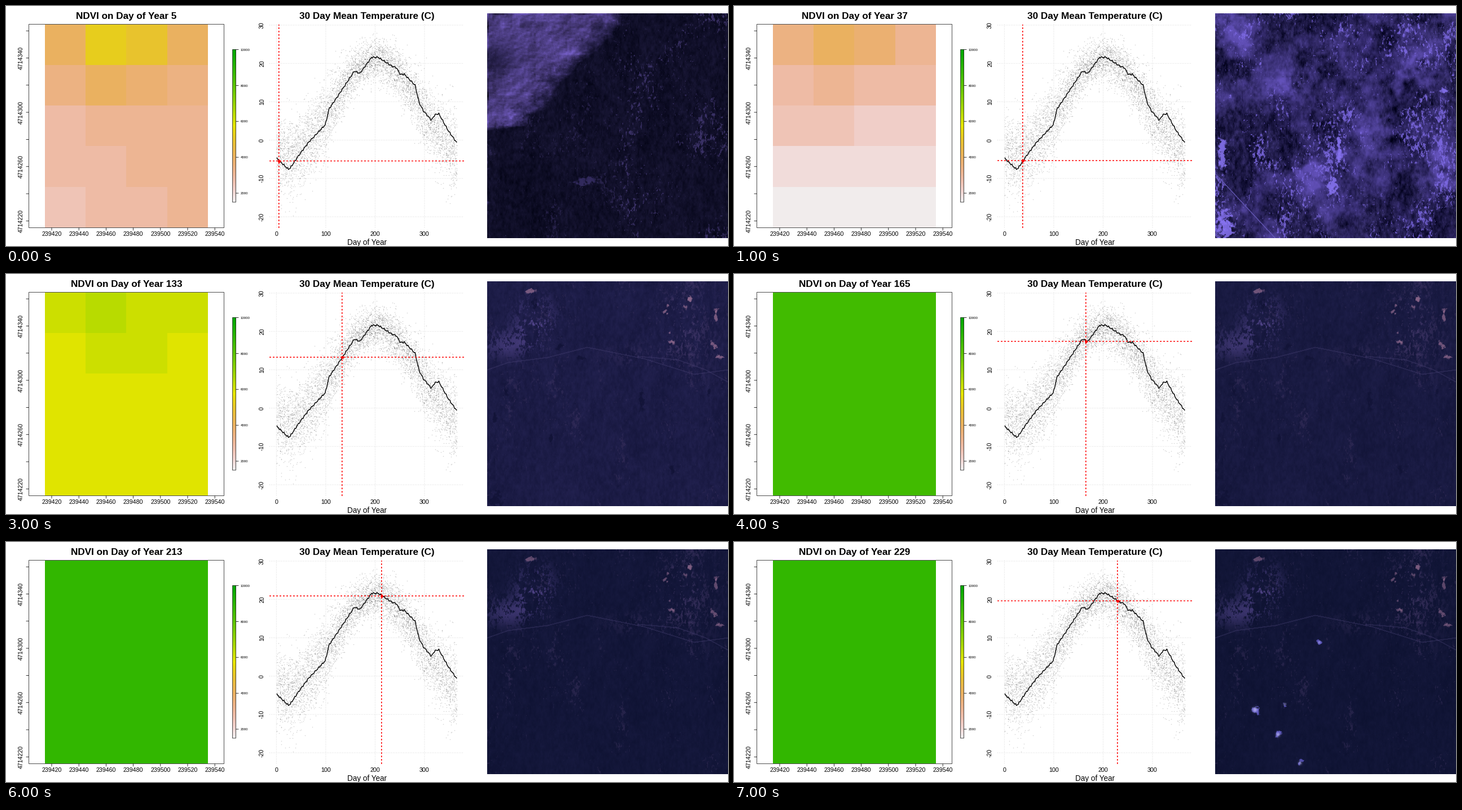
These frames come from a looping animation (1280x427 px, 8 s). A matplotlib script:

```python
import colorsys
import numpy as np
import matplotlib.pyplot as plt
from matplotlib.animation import FuncAnimation
from matplotlib.colors import ListedColormap
from matplotlib.patches import Rectangle

DPI = 64
PT = 72 / DPI  # points per pixel
plt.rcParams["font.family"] = "Liberation Sans"

# day: NDVI level in hundreds, change per row south, per column east,
# and extra height of the bright spot at the north edge
GROWTH = {
    5: (33, -1.2, 1.2, 21),
    37: (31, -3.8, -0.5, 8),
    85: (25.2, -0.8, -2, 9),
    133: (59.3, -0.6, 0, 3.6),
    165: (85, 0, 0, 0),
    197: (87.5, 0.3, -1.3, 0),
    213: (88, 0, 0, 0),
    229: (88, 0, 0, 0),
}
DAYS = list(GROWTH)

# turning points of the mean temperature: day, degrees
TURNS = [(1, -4.8), (24, -7.6), (28, -7.3), (43, -4.4), (65, -0.6), (99, 4),
         (107, 8.2), (126, 11.8), (158, 18), (169, 17.4), (193, 21.6),
         (206, 21.6), (234, 19.3), (243, 18.9), (251, 17.1), (259, 17.2),
         (281, 14.3), (289, 9.8), (298, 7.6), (314, 5.2), (321, 6.6),
         (329, 6.9), (348, 2.5), (365, -0.6)]


def day_x(day):
    return 479.4 + 0.875 * day


def temp_y(temp):
    return 238.6 - 6.82 * temp


def mean_temp(day):
    wiggle = 0.14 * np.sin(0.9 * day) + 0.1 * np.sin(1.7 * day + 1)
    return np.interp(day, *zip(*TURNS)) + wiggle


def ndvi(day):
    level, south, east, peak = GROWTH[day]
    row, col = np.mgrid[0:5, 0:4]
    spot = peak * np.exp(-row**2 - ((col - 1.3) / 1.3) ** 2)
    value = level + south * row + east * (col - 1.5) + spot
    return 100 * (3 * np.round((value - 1) / 3) + 1)


def terrain(n=255):
    """White through orange and yellow to green."""
    colors = []
    for t in np.linspace(1, 0, n):
        if t < 0.5:
            hsv = (4 - 4 * t) / 12, 1, 0.65 + 0.5 * t
        else:
            u = 2 * t - 1
            hsv = (1 - u) / 6, 1 - u, 0.9 + 0.05 * u
        colors.append(colorsys.hsv_to_rgb(*hsv))
    return ListedColormap(colors)


# ---- satellite scenes -------------------------------------------------

LEFT, TOP, W, H = 853, 13, 427, 400
Y, X = np.mgrid[TOP:TOP + H, LEFT:LEFT + W].astype(float)


def noise(rng, sx, sy):
    grid = rng.random((int(H / sy) + 2, int(W / sx) + 2))
    gy, gx = np.arange(H) / sy, np.arange(W) / sx
    iy, ix = gy.astype(int), gx.astype(int)
    fy, fx = (gy - iy)[:, None], (gx - ix)[None, :]
    a, b = grid[np.ix_(iy, ix)], grid[np.ix_(iy, ix + 1)]
    c, d = grid[np.ix_(iy + 1, ix)], grid[np.ix_(iy + 1, ix + 1)]
    return (a * (1 - fx) + b * fx) * (1 - fy) + (c * (1 - fx) + d * fx) * fy


def fbm(rng, sx, sy, octaves=3):
    n = sum(noise(rng, max(sx / 2**k, 1), max(sy / 2**k, 1)) * 0.6**k
            for k in range(octaves))
    return (n - n.mean()) / n.std()


def blend(img, color, alpha):
    a = np.clip(alpha, 0, 1)[..., None]
    img += (np.array(color) - img) * a


def bump(x, y, rx, ry):
    return np.exp(-((X - x) / rx) ** 2 - ((Y - y) / ry) ** 2)


def patches(img, rng, spots, color, opacity=1.0):
    rough = fbm(rng, 6, 6)
    for x, y, rx, ry in spots:
        d = np.hypot((X - x) / rx, (Y - y) / ry)
        blend(img, color, np.clip((1.1 - d + 0.35 * rough * (d < 2)) * 2, 0, 1) * opacity)


def scatter_spots(rng, x, y, dx, dy, count, size):
    """Small ellipses strewn around a centre."""
    return [(rng.normal(x, dx), rng.normal(y, dy), *rng.uniform(size / 2, size, 2))
            for _ in range(count)]


def ground(rng, base, grain, tint=(0.8, 0.7, 1.2)):
    n = 0.6 * fbm(rng, 26, 60) + fbm(rng, 4, 7)
    return np.array(base) + grain * n[..., None] * np.array(tint)


def specks(img, rng, color, cut, weight=1.0):
    n = fbm(rng, 3, 5) + 0.8 * fbm(rng, 40, 60)
    blend(img, color, np.clip((n - cut) * 0.6, 0, 0.8) * weight)


LAKES = [(937, 50, 7, 8), (980, 127, 5, 10), (1020, 149, 8, 3), (1127, 230, 4, 17),
         (1180, 347, 3, 10), (887, 212, 4, 9), (867, 256, 4, 8), (966, 295, 3, 9),
         (868, 400, 13, 12), (1246, 212, 3, 7)]


def winter_cloud():
    rng = np.random.default_rng(1)
    img = ground(rng, (16, 15, 40), 3.6)
    specks(img, rng, (74, 62, 125), 1.7, 0.5 + 0.4 * (X > 1080))
    patches(img, rng, [(1030, 310, 16, 9)], (70, 58, 125), 0.6)
    lumps = fbm(rng, 28, 24, 5)
    relief = lumps - np.roll(lumps, (3, 3), (0, 1))
    edge = np.interp(Y, [14, 110, 185, 212, 226], [1112, 1014, 948, 918, 840])
    alpha = np.clip((edge - X) / 45 + 0.18 * lumps, 0, 1)
    alpha *= 1 - 0.65 * bump(858, 95, 45, 32)
    light = 1 + 0.16 * relief + 0.08 * lumps + 0.25 * bump(905, 195, 50, 22)
    shade = np.array([84, 68, 142]) * light[..., None]
    img += (shade - img) * (alpha * 0.9)[..., None]
    return img


def winter_haze():
    rng = np.random.default_rng(2)
    img = ground(rng, (27, 23, 66), 10)
    haze = 0.12 + 0.18 * fbm(rng, 50, 50, 5)
    wisps = 1 + 0.35 * fbm(rng, 14, 14)
    for x, y in [(1140, 220), (1020, 290), (985, 140), (1210, 110), (890, 30), (1250, 300)]:
        haze += 0.45 * bump(x, y, 42, 42) * wisps
    blend(img, (112, 92, 208), np.clip(haze, 0, 0.8))
    specks(img, rng, (130, 110, 235), 1.3)
    patches(img, rng, [(1060, 318, 9, 16), (868, 390, 14, 22), (866, 265, 7, 25),
                       (1262, 150, 8, 4), (1072, 250, 3, 26)], (138, 118, 246), 0.85)
    track = np.abs(Y - (298 + (X - 853) * 1.08))
    blend(img, (105, 92, 190), np.clip(1.5 - track, 0, 0.8) * (X < 960))
    return img


def thaw():
    rng = np.random.default_rng(3)
    img = ground(rng, (29, 23, 62), 7)
    blend(img, (46, 29, 56), np.clip(0.3 * fbm(rng, 22, 110), 0, 0.6))
    specks(img, rng, (92, 70, 122), 1.9, 0.7)
    ponds = [(*rng.uniform((870, 30), (1270, 380)), *rng.uniform(1.5, 4, 2))
             for _ in range(16)]
    patches(img, rng, LAKES + ponds, (134, 118, 240))
    patches(img, rng, [(1127, 230, 5, 18), (1108, 285, 6, 4)], (198, 160, 236))
    return img


def leafed(day, clouds=()):
    """Green season; the land stays put and darkens with the date."""
    rng = np.random.default_rng(4)
    t = (day - 133) / 96
    img = ground(rng, (28 - 11 * t, 28 - 7 * t, 70 - 16 * t), 2.2 - t)
    town = bump(938, 85, 32, 40) + 0.6 * bump(890, 125, 45, 25)
    east = bump(1205, 90, 45, 95) + 0.5 * bump(1120, 145, 60, 20)
    specks(img, rng, (112, 92, 178), -0.3, 0.8 * np.clip(town, 0, 1))
    specks(img, rng, (104, 82, 138), 0.5, 0.5 * np.clip(east, 0, 1))
    specks(img, rng, (72, 58, 104), 2, 0.45)
    for xs, ys in [([853, 890, 960, 1030, 1130, 1220, 1280], [170, 157, 148, 130, 150, 178, 170]),
                   ([1120, 1190, 1240, 1280], [146, 152, 170, 192])]:
        road = np.abs(Y - np.interp(X, xs, ys))
        blend(img, (75, 68, 120), np.clip(1.2 - road, 0, 0.3) * (X >= xs[0]))
    patches(img, rng, LAKES, (13, 15, 48), 0.6 - 0.3 * t)
    fields = [(932, 30, 9, 4)]
    for x, y in [(1172, 65), (1175, 110), (1206, 46), (1258, 75), (1255, 130), (1263, 148)]:
        fields += scatter_spots(rng, x, y, 3, 5, 3, 5)
    patches(img, rng, fields, (142, 104, 140), 0.8 - 0.2 * t)
    for x, y, r in clouds:
        patches(img, rng, scatter_spots(rng, x, y, r / 3, r / 3, 3, r), (94, 88, 196), 0.8)
        blend(img, (205, 200, 255), r / 10 * bump(x, y, r * 0.6, r * 0.6))
    return img


CLOUDS = {
    197: [(1193, 81, 10), (1165, 68, 7), (1272, 106, 6), (907, 119, 4), (1203, 258, 5),
          (1257, 202, 4), (1180, 35, 3), (1178, 155, 4)],
    229: [(923, 298, 7), (964, 342, 6), (976, 288, 4), (1003, 393, 5), (1037, 178, 4)],
}
SCENES = [winter_cloud(), winter_haze(), thaw()]
SCENES += [leafed(day, CLOUDS.get(day, ())) for day in DAYS[3:]]
SCENES = [np.clip(s, 0, 255).astype(np.uint8) for s in SCENES]

# ---- figure -----------------------------------------------------------

fig = plt.figure(figsize=(1280 / DPI, 427 / DPI), dpi=DPI, facecolor="white")
ax = fig.add_axes([0, 0, 1, 1])
ax.axis("off")


def text(x, y, s, size, **kw):
    kw = {"ha": "center", "va": "baseline", **kw}
    return ax.text(x, y, s, fontsize=size * PT, **kw)


def line(xs, ys, color="black", width=0.8, **kw):
    return ax.plot(xs, ys, color=color, lw=width * PT, snap=False, **kw)[0]


def frame_box(x0, y0, x1, y1):
    ax.add_patch(Rectangle((x0, y0), x1 - x0, y1 - y0, fill=False, snap=False,
                           ec="#222222", lw=0.8 * PT, zorder=4))


def picture(data, extent, **kw):
    return ax.imshow(data, extent=extent, aspect="auto", interpolation="nearest", **kw)


# NDVI map
scale = dict(cmap=terrain(), vmin=1500, vmax=10000)
cells = picture(ndvi(DAYS[0]), (69, 358, 394, 33), **scale)
frame_box(40.5, 32.5, 386.5, 394.5)
for k in range(7):
    x = 81 + 48.2 * k
    line([x, x], [394.5, 399])
    text(x, 409, str(239420 + 20 * k), 10.6)
for k in range(8):
    y = 382.3 - 48.3 * k
    line([36, 40.5], [y, y])
    if k % 2 == 0:
        text(27, y, str(4714220 + 20 * k), 10.6, rotation=90, va="center")
title = text(213.5, 23, "", 17.1, weight="bold")

# colour key
picture(np.linspace(10000, 1500, 255)[:, None], (401.5, 407.5, 349, 77.5), **scale)
frame_box(401.5, 77.5, 407.5, 349)
for v in range(2000, 10001, 2000):
    y = 77.5 + (10000 - v) * 271.5 / 8500
    line([407.5, 412], [y, y])
    text(416, y + 2.2, str(v), 6.1, ha="left")

# temperature chart
text(640, 23, "30 Day Mean Temperature (C)", 17.1, weight="bold")
text(640, 425, "Day of Year", 13.5)
dots = dict(color="#d6d6d6", width=1, linestyle=(0, (1, 2)), zorder=1)
for d in range(0, 301, 100):
    line([day_x(d)] * 2, [33, 395], **dots)
    text(day_x(d), 409, str(d), 10.6)
for t in range(-20, 31, 10):
    line([467, 812], [temp_y(t)] * 2, **dots)
    text(454, temp_y(t), str(t), 10.6, rotation=90, va="center")

rng = np.random.default_rng(11)
days = np.arange(1, 366)
obs_day = np.tile(days, 15)
season = np.cos(2 * np.pi * (obs_day - 20) / 365)
obs = 8.5 - 12.5 * season + rng.normal(size=obs_day.size) * (4 + 1.2 * season)
keep = (obs > -21) & (obs < 28.5)
ax.scatter(day_x(obs_day[keep]), temp_y(obs[keep]), s=(1.5 * PT) ** 2,
           color="black", alpha=0.18, lw=0, zorder=2)
line(day_x(days), temp_y(mean_temp(days)), width=1.4, zorder=3)

red = dict(color="red", width=1.5, linestyle=(0, (2, 2)), zorder=5)
v_line = line([0, 0], [395, 33], **red)
h_line = line([467, 812], [0, 0], **red)
marker = line([0], [0], color="red", marker="o", ms=5 * PT, mew=0, zorder=6)

photo = picture(SCENES[0], (LEFT, LEFT + W, TOP + H, TOP))

ax.set_xlim(0, 1280)
ax.set_ylim(427, 0)


def draw(i):
    day = DAYS[i]
    x, y = day_x(day), temp_y(mean_temp(day))
    title.set_text(f"NDVI on Day of Year {day}")
    cells.set_data(ndvi(day))
    v_line.set_xdata([x, x])
    h_line.set_ydata([y, y])
    marker.set_data([x], [y])
    photo.set_data(SCENES[i])
    return title, cells, v_line, h_line, marker, photo


anim = FuncAnimation(fig, draw, frames=len(DAYS), interval=1000, repeat=True, repeat_delay=0)
plt.show()
```
